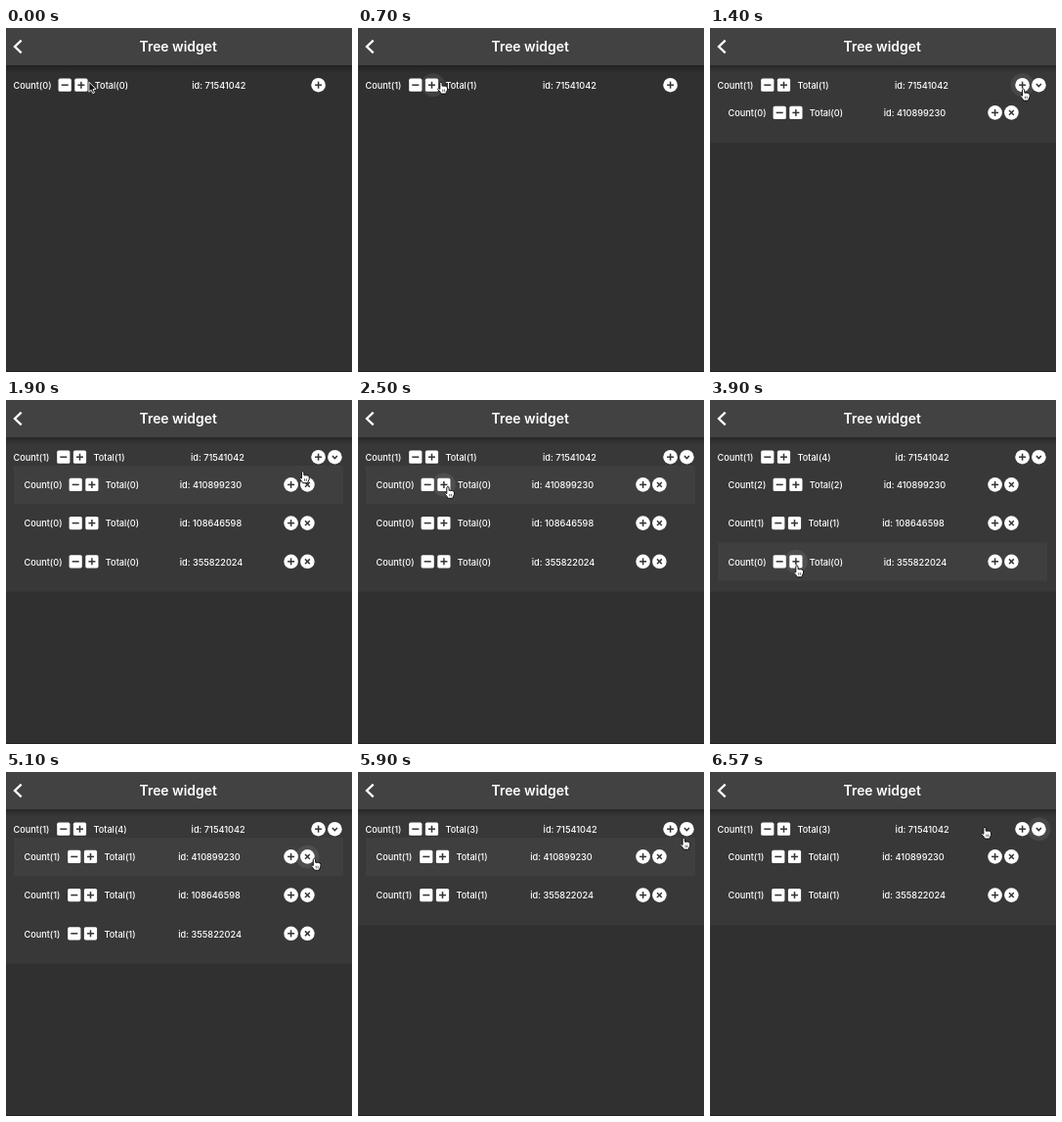
Write an HTML page with a canvas that moves like this. It is 354 px wide and 351 px high and loops after 6.74 s.

```html
<!DOCTYPE html>
<html lang="en">
<head>
<meta charset="utf-8">
<title>Tree widget</title>
<style>
  html, body { margin: 0; width: 100%; height: 100%; overflow: hidden; background: #303030; }
  canvas { display: block; width: 354px; height: 351px; }
</style>
</head>
<body>
<canvas id="stage"></canvas>
<script>
const W = 354, H = 351, LOOP = 6740, LAST = 6570;
const ROW_TOP = 67, PITCH = 39.2;
const BODY = '#303030', PANEL = '#383838', HOVER = '#3f3f3f', INK = '#333';

const canvas = document.getElementById('stage');
const ctx = canvas.getContext('2d');
const dpr = window.devicePixelRatio || 1;
canvas.width = W * dpr;
canvas.height = H * dpr;

// Row 0 is the root; its children are indented on both sides.
const rowLeft = row => row ? 19 : 8;
const rowY = row => row ? 86.4 + (row - 1) * PITCH : 58.2;
const columns = {
  minus: row => rowLeft(row) + 52.2,
  plus: row => rowLeft(row) + 68.9,
  add: row => 319.6 - (row ? 28 : 0),
  end: row => 336.4 - (row ? 28 : 0),
  blank: () => 281
};

// What a click does to the tree.
const actions = {
  plus: (tree, row) => tree.rows[row].count++,
  minus: (tree, row) => tree.rows[row].count--,
  add: tree => tree.rows.push({ id: ids[tree.rows.length], count: 0 }),
  end: (tree, row) => row ? tree.rows.splice(row, 1) : tree.open = !tree.open
};
const ids = ['71541042', '410899230', '108646598', '355822024'];

// Where the pointer rests, and when it clicks there.
const stop = (column, row, from, to, dx, dy, ...clicks) =>
  ({ column, row, from, to, clicks, x: columns[column](row) + dx, y: rowY(row) + dy });
const stops = [
  stop('plus', 0, 200, 700, 8, -3, 600),
  stop('add', 0, 1100, 1800, 1, 4, 1400, 1500, 1700),
  stop('plus', 1, 2400, 3000, 4, 2, 2600, 3000),
  stop('plus', 2, 3400, 3600, 3, 2, 3600),
  stop('plus', 3, 3900, 4100, 1, 4, 4100),
  stop('minus', 1, 4500, 4700, 2, 2, 4600),
  stop('end', 1, 5000, 5100, 7, 2),
  stop('end', 2, 5400, 5600, 2, 0, 5500),
  stop('end', 0, 6000, 6500, 1, 0, 6100, LAST),
  stop('blank', 0, LAST, LOOP, 0, -2)
];

function treeAt(t) {
  const tree = { open: true, rows: [{ id: ids[0], count: 0 }] };
  for (const { column, row, clicks } of stops)
    for (const at of clicks) if (t >= at) actions[column](tree, row);
  return tree;
}

function pointerAt(t) {
  const next = stops.findIndex(s => t <= s.to);
  const b = stops[next], a = stops[next - 1] || b;
  if (t >= b.from || a === b) return [b.x, b.y];
  const k = (t - a.to) / (b.from - a.to);
  return [a.x + (b.x - a.x) * k * k * (3 - 2 * k), a.y + (b.y - a.y) * Math.sqrt(k)];
}

function rect(x, y, w, h, color) {
  ctx.fillStyle = color;
  ctx.fillRect(x, y, w, h);
}

function text(str, x, y) {
  ctx.fillStyle = '#fff';
  ctx.fillText(str, x, y + 3.7);
}

function line(color, width, ...points) {
  ctx.strokeStyle = color;
  ctx.lineWidth = width;
  ctx.beginPath();
  points.forEach(([x, y]) => ctx.lineTo(x, y));
  ctx.stroke();
}

function disc(x, y, r, color) {
  ctx.fillStyle = color;
  ctx.beginPath();
  ctx.arc(x, y, r, 0, 7);
  ctx.fill();
}

function glyph(kind, x, y) {
  const draw = (...pts) => line(INK, 1.5, ...pts.map(([dx, dy]) => [x + dx, y + dy]));
  if (kind === '+' || kind === '-') draw([-3.5, 0], [3.5, 0]);
  if (kind === '+') draw([0, -3.5], [0, 3.5]);
  if (kind === 'x') {
    draw([-2.4, -2.4], [2.4, 2.4]);
    draw([-2.4, 2.4], [2.4, -2.4]);
  }
  if (kind === 'down') draw([-2.5, -1.2], [0, 1.4], [2.5, -1.2]);
  if (kind === 'right') draw([-1.2, -2.5], [1.4, 0], [-1.2, 2.5]);
}

function square(kind, x, y) {
  ctx.fillStyle = '#fff';
  ctx.beginPath();
  ctx.roundRect(x - 6.6, y - 6.6, 13.2, 13.2, 1.6);
  ctx.fill();
  glyph(kind, x, y);
}

function round(kind, x, y) {
  disc(x, y, 7.3, '#fff');
  glyph(kind, x, y);
}

function drawRow({ id, count }, row, total, endKind) {
  const left = rowLeft(row), y = rowY(row);
  // A narrow "1" pulls everything after it to the left.
  const shift = count === 1 ? -1.4 : 0;
  text(`Count(${count})`, left - 0.6, y);
  square('-', columns.minus(row) + shift, y);
  square('+', columns.plus(row) + shift, y);
  text(`Total(${total})`, left + 82.8 + shift, y);
  text('id: ' + id, (row ? 177.7 : 190.3) + shift / 2 - (total === 1 ? 0.7 : 0), y);
  round('+', columns.add(row), y);
  if (endKind) round(endKind, columns.end(row), y);
}

function paintPointer(fill, edge) {
  ctx.fillStyle = fill;
  ctx.strokeStyle = edge;
  ctx.lineWidth = 0.9;
  ctx.fill();
  ctx.stroke();
}

function arrow() {
  ctx.beginPath();
  [[0, 0], [0, 10], [2.3, 8], [3.9, 11.5], [5.6, 10.7], [4.1, 7.3], [7.2, 7.1]]
    .forEach(p => ctx.lineTo(...p));
  ctx.closePath();
  paintPointer('#111', '#fff');
}

function hand() {
  ctx.beginPath();
  ctx.moveTo(-1, 6.5);
  ctx.lineTo(-1, 0.7);
  ctx.quadraticCurveTo(0, -0.9, 1, 0.7);
  ctx.lineTo(1.2, 3.6);
  ctx.quadraticCurveTo(4.5, 2.8, 6.1, 5);
  ctx.quadraticCurveTo(6.2, 8, 4.9, 9.4);
  ctx.lineTo(4.8, 10.8);
  ctx.lineTo(0.2, 10.8);
  ctx.quadraticCurveTo(-0.6, 9, -3, 6.6);
  ctx.quadraticCurveTo(-2.8, 4.9, -1, 6.5);
  ctx.closePath();
  paintPointer('#fff', '#111');
  for (const x of [1.7, 3.4]) line('#111', 0.6, [x, 6.7], [x, 9]);
}

function header() {
  const shade = ctx.createLinearGradient(0, 38, 0, 46);
  shade.addColorStop(0, 'rgba(0,0,0,.3)');
  shade.addColorStop(1, 'rgba(0,0,0,0)');
  rect(0, 38, W, 8, shade);
  rect(0, 0, W, 38, '#424242');
  line('#fff', 2.3, [15.7, 12.7], [9, 19], [15.7, 25.3]);
  ctx.font = '600 13.9px Inter, sans-serif';
  ctx.textAlign = 'center';
  ctx.fillStyle = '#fff';
  ctx.fillText('Tree widget', 176.2, 23.8);
}

function draw(t) {
  const [px, py] = pointerAt(t);
  const { rows, open } = treeAt(t);
  const shown = open ? rows : rows.slice(0, 1);
  const children = shown.length - 1;
  const sum = rows.reduce((n, r) => n + r.count, 0);

  ctx.setTransform(dpr, 0, 0, dpr, 0, 0);
  rect(0, 0, W, H, BODY);
  if (children) {
    rect(0, 38, W, 40 + PITCH * children, PANEL);
    const over = Math.floor((py - ROW_TOP) / PITCH);
    if (over >= 0 && over < children) rect(8, ROW_TOP + over * PITCH, 337, PITCH, HOVER);
  }
  header();

  // A halo marks the button under the pointer or one clicked just now.
  for (const { column, row, from, to, clicks } of stops) {
    const lit = t >= from && t <= to || clicks.some(c => t >= c && t < c + 200);
    if (lit && column !== 'blank') disc(columns[column](row), rowY(row), 12, 'rgba(255,255,255,.08)');
  }

  ctx.font = '500 9.2px Inter, sans-serif';
  ctx.textAlign = 'left';
  const chevron = rows.length > 1 && (open ? 'down' : 'right');
  shown.forEach((r, i) => drawRow(r, i, i ? r.count : sum, i ? 'x' : chevron));

  rect(0, 350, W, 1, '#222');
  ctx.translate(px, py);
  if (t < stops[0].from) {
    arrow();
  } else {
    ctx.scale(1.1, 1.1);
    hand();
  }
}

// Time advances in steps of 100 ms, with a late final step.
function tick(now) {
  const t = now % LOOP;
  draw(t >= LAST ? LAST : Math.floor(t / 100) * 100);
  requestAnimationFrame(tick);
}
requestAnimationFrame(tick);
</script>
</body>
</html>
```
